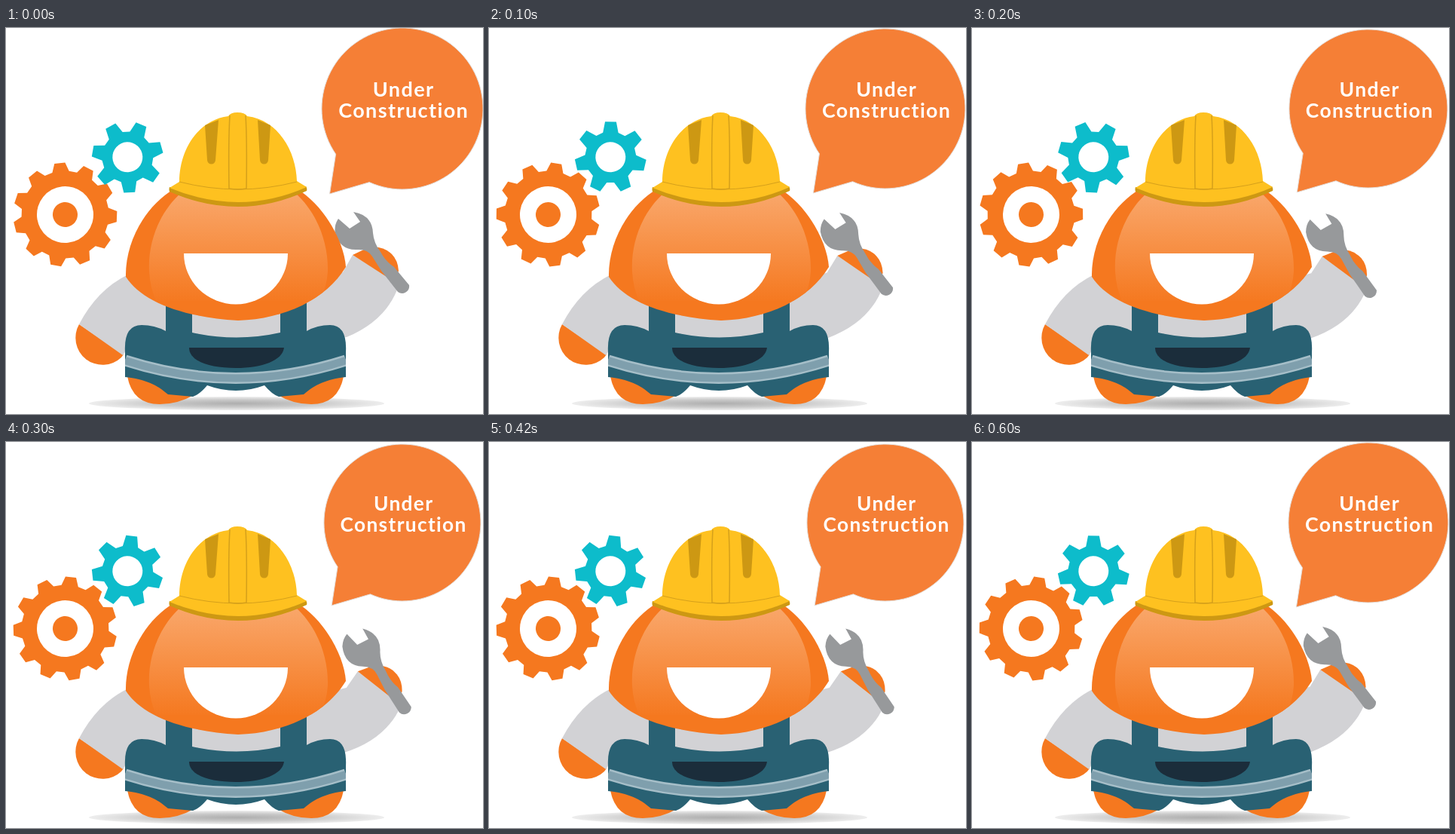
Animation of 633x512 px, one loop 0.7 s. Source, as an HTML page:

```html
<!DOCTYPE html>
<html lang="en">
<head>
<meta charset="utf-8">
<title>Under Construction</title>
<style>
html, body { margin: 0; width: 100%; height: 100%; overflow: hidden; background: #fff; }
svg { display: block; width: 100%; height: 100%; }
text { font: 700 27px Lato, "Open Sans", sans-serif; letter-spacing: 1.4px; fill: #fff; text-anchor: middle; }
.orange { fill: #f5781f; }
.grey { fill: #d2d2d5; }
.blue { fill: #296173; }
.dark { fill: #cd9813; }
.yellow { fill: #fec120; }
</style>
</head>
<body>
<svg viewBox="0 0 633 512">
  <defs>
    <linearGradient id="skin" gradientUnits="userSpaceOnUse" x1="0" y1="222" x2="0" y2="365">
      <stop stop-color="#f9a669"/><stop offset="1" stop-color="#f5781f"/>
    </linearGradient>
    <radialGradient id="shade">
      <stop stop-color="#aeaeae"/><stop offset=".55" stop-color="#cacaca"/><stop offset="1" stop-color="#eee"/>
    </radialGradient>
    <path id="overalls" d="M158 430Q156 394 180 394Q197 394 212 402V366L247 376V404Q306 417 364 404V376L399 362V402Q413 394 430 394Q453 394 451 430V463C425 466 410 473 395 486L362 489Q353 486 343 474Q305 488 267 474Q257 486 248 489L215 486C200 473 185 466 158 463Z"/>
    <path id="head" d="M224 213C184 236 158 285 159 330C180 362 230 383 308 388C370 386 425 360 451 317C449 285 424 237 386 213Z"/>
    <clipPath id="cloth"><use href="#overalls"/></clipPath>
    <clipPath id="skull"><use href="#head"/></clipPath>
  </defs>

  <ellipse cx="306" cy="498" rx="196" ry="9" fill="url(#shade)"/>

  <g id="big" class="orange"></g>
  <g id="small" fill="#0dbccb"></g>

  <g id="bubble">
    <path d="M437.600 167.300A107 107 0 1 1 482.200 204.600L429.500 220Z" fill="#f57f36" stroke="#e3dcd8"/>
    <text x="527.700" y="91">Under</text>
    <text x="527.700" y="119">Construction</text>
  </g>

  <!-- left arm, body and raised arm -->
  <path class="orange" d="M97 393A36 36 0 0 0 153 437L156 433Z"/>
  <path class="grey" d="M162 327Q121 347 97 393L155 434L165 420H400V360Z"/>
  <g id="arm">
    <path class="grey" d="M460 301L522 339Q507 387 452 410L385 412V345L447 324Z"/>
    <path class="orange" d="M460 301L481 291Q500 288 512 300Q520 308 521 322L516 337Z"/>
    <path fill="#97999b" d="M441 253L456 266L470 257L461 244Q486 248 487 272Q488 285 497 297Q504 310 515 317L535 341A9.500 9.500 0 0 1 520 350L498 322L486 303Q480 293 466 294Q442 295 436.500 270Q436 260 441 253Z"/>
  </g>

  <path class="orange" d="M161 462Q168 499 204 499Q228 499 249 487V465Z"/>
  <path class="orange" d="M448 462Q441 499 405 499Q381 499 361 487V465Z"/>
  <path fill="#fff" d="M267 473H343L362 489Q335 482 305 482Q275 482 248 489Z"/>
  <use href="#overalls" class="blue"/>
  <g clip-path="url(#cloth)" fill="none">
    <path d="M158 441Q305 488 451 441" stroke="#a5bec8" stroke-width="15"/>
    <path d="M158 441Q305 488 451 441" stroke="#7f9fad" stroke-width="10"/>
  </g>
  <path fill="#1b2d3b" d="M243 424H369C367 441 340 451 305 451C270 451 243 442 243 424Z"/>

  <use href="#head" class="orange"/>
  <path fill="url(#skin)" clip-path="url(#skull)" d="M232 219C203 245 188 285 190 323Q191 343 199 362H416Q426 343 427 323C428 285 413 245 384 219Z"/>
  <path fill="#fff" d="M236 299H374A69 67.500 0 0 1 236 299Z"/>

  <!-- helmet -->
  <path class="dark" d="M217 211Q216 214 217 217Q262 237 308 237Q354 237 399 216Q400 213 398 210Z"/>
  <path class="yellow" d="M230 204C230 163 254 122 295 117Q298 112 307 112Q317 112 320 117C361 122 385 163 386 203L399 211Q354 231 308 231Q262 231 217 212Z"/>
  <path class="dark" d="M264 129L282 122L278 175A5.500 5.500 0 0 1 267 175Z"/>
  <path class="dark" d="M334 122L351 129L348 175A5.500 5.500 0 0 1 337 175Z"/>
  <g fill="none" stroke="#d5a01b">
    <path stroke-width="1.500" d="M297 116Q295 150 296 213Q308 215 319 213Q320 150 318 116"/>
    <path d="M230 204Q308 224 386 204"/>
  </g>
</svg>
<script>
const $ = id => document.getElementById(id);

// Cog centred on the origin; top and foot are tooth widths as shares of the pitch.
function cog(teeth, outer, root, hole, top, foot) {
  const pitch = 2 * Math.PI / teeth;
  const points = [];
  for (let i = 0; i < teeth; i++) {
    for (const [r, off] of [[root, -foot], [outer, -top], [outer, top], [root, foot]]) {
      const a = (i + off / 2) * pitch;
      points.push((r * Math.cos(a)).toFixed(2) + " " + (r * Math.sin(a)).toFixed(2));
    }
  }
  return `<path fill-rule="evenodd" d="M${points.join("L")}ZM${hole} 0A${hole} ${hole} 0 1 0 ${-hole} 0A${hole} ${hole} 0 1 0 ${hole} 0Z"/>`;
}

$("big").innerHTML = cog(11, 69, 58, 37.5, 0.36, 0.68) + '<circle r="16.500"/>';
$("small").innerHTML = cog(7, 47.5, 34, 20, 0.35, 0.68);

function draw(now) {
  const step = Math.floor(now / 100) % 7;
  const pose = Math.min(step, 3, 7 - step);
  const set = (id, value) => $(id).setAttribute("transform", value);
  set("big", `translate(78.5 247.5) rotate(${-96 + 15 * pose})`);
  set("small", `translate(161.3 171.3) rotate(${87 - 22.5 * pose})`);
  set("bubble", `translate(526 107) scale(${1 - pose / 107}) translate(-526 -107)`);
  set("arm", `rotate(${1.8 * pose} 429 375)`);
}

const start = performance.now();
function tick() {
  draw(performance.now() - start);
  requestAnimationFrame(tick);
}
tick();
</script>
</body>
</html>
```
